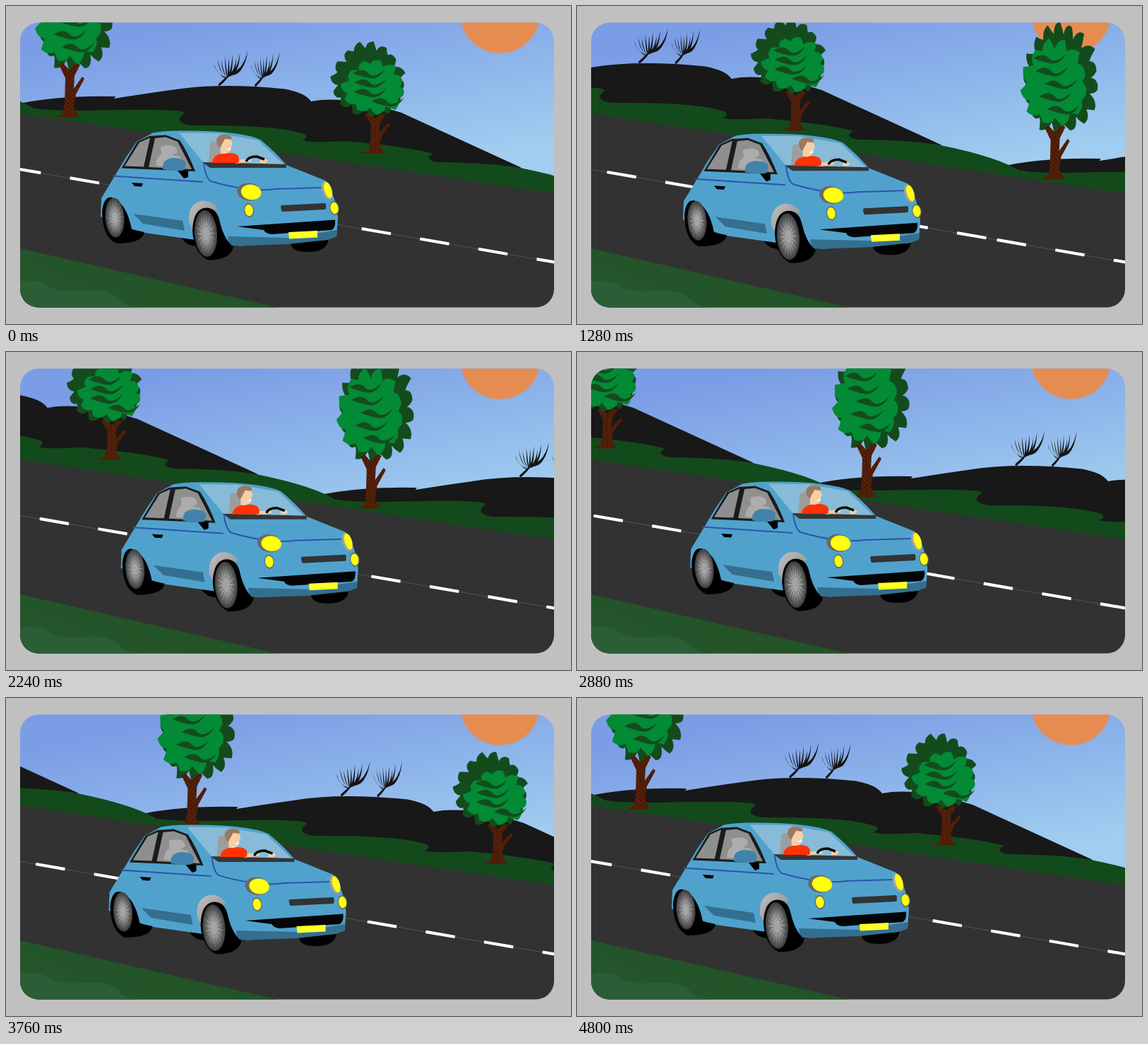
An HTML page for the animation above (4.88 s loop, 800 by 450 pixels).

```html
<!DOCTYPE html>
<html lang="en">
<head>
<meta charset="utf-8">
<title>Country drive</title>
<style>
  html, body { margin: 0; width: 100%; height: 100%; overflow: hidden; background: #c0c0c0; }
  svg { display: block; width: 800px; height: 450px; }
</style>
</head>
<body>
<svg viewBox="0 0 800 450">
  <defs>
    <clipPath id="window"><rect x="20" y="23.5" width="756" height="403" rx="26"/></clipPath>
    <linearGradient id="sky" gradientUnits="userSpaceOnUse" x1="380" y1="10" x2="425" y2="260">
      <stop offset="0" stop-color="#7b9de5"/><stop offset="1" stop-color="#a1cef0"/>
    </linearGradient>
    <radialGradient id="sun">
      <stop offset=".94" stop-color="#e68c51"/><stop offset="1" stop-color="#e68c51" stop-opacity="0"/>
    </radialGradient>
    <linearGradient id="verge" x1="0" y1="1" x2=".8" y2=".5">
      <stop offset="0" stop-color="#27562f"/><stop offset="1" stop-color="#215426"/>
    </linearGradient>
    <radialGradient id="hub">
      <stop offset="0" stop-color="#b4b4b4"/><stop offset=".4" stop-color="#858585"/><stop offset="1" stop-color="#3c3c3c"/>
    </radialGradient>
    <linearGradient id="arch" x2="1" y2="1">
      <stop offset="0" stop-color="#c2c2c2"/><stop offset="1" stop-color="#858585"/>
    </linearGradient>
    <pattern id="bark" width="7" height="6" patternUnits="userSpaceOnUse">
      <rect width="7" height="6" fill="#4c1c06"/>
      <path d="M1 1h.8M5 4h.8" stroke="#b0602c" stroke-width=".8"/>
    </pattern>
    <path id="trunk" d="M-16 0L-6 -5L-3 -20L-2 -55L-11 -74L-5 -76L4 -66L12 -76L19 -74L11 -58L10 -40L22 -57L25 -54L13 -32L10 -14L17 0L0 1Z" fill="url(#bark)"/>
    <g id="hills">
      <path d="M10 140Q70 126 155 128L153 131Q190 125 233 119Q300 108 395 117.5Q424 123 432 135Q480 126 560 151L728 228L800 290L10 170Z" fill="#181818"/>
    </g>
    <g id="grass">
      <path d="M10 138Q40 149 110 148Q260 144 252 152Q236 165 262 169Q390 168 424 182Q428 187 419 190Q430 194 480 191Q570 199 605 209Q590 217 610 221Q690 222 728 229Q812 246 843 267V300L10 170Z" fill="#134a1b"/>
    </g>
    <g id="trees"></g>
  </defs>

  <g clip-path="url(#window)">
    <rect width="800" height="450" fill="url(#sky)"/>
    <circle cx="699.5" cy="10" r="58.5" fill="url(#sun)"/>
    <g id="land"></g>
    <path d="M0 149L800 268.6V450H0Z" fill="#323232"/>
    <path d="M20 231.3L777 362.8" stroke="#626262" stroke-width=".7"/>
    <g id="dashes" stroke="#fff" stroke-width="4.2"></g>
    <path d="M0 338.5L20 343L386 427V450H0Z" fill="url(#verge)"/>
    <path d="M20 390Q48 386 60 396T110 403T160 415T216 427H20Z" fill="#2b5d37"/>

    <g id="car">
      <!-- underside and body -->
      <path d="M403 335L457 328Q456 347 430 348T403 335ZM248 327L274 332L270 340Q254 339 248 327Z"/>
      <path d="M135 272L170 214L185 192L208 179.5Q226 176 250 176.5Q330 176 360 189Q381 206 397 225L452 247Q467 268 470 299L468 326L455 331L330 339.5L190 320L134 298Z" fill="#50a2cd"/>
      <path d="M314 326L400 328L469 317L468 326L455 331L400 337L330 339.5L316 337Z" fill="#346f8f"/>

      <!-- side windows -->
      <path d="M163.5 229.5L186 192L203 184L226 182.5L246 190Q257 206 268 234Z" fill="#1b1b1b"/>
      <path d="M168 226.5L189 193L204 186.5L195 227.5ZM202 228L211 187L226 185.5L243 192L263 231Z" fill="#8f8f8f"/>
      <path d="M219 199Q242 193 242 207L236 211L246 213L253 229L212 226Q213 213 220 210Z" fill="#acacac"/>

      <!-- windscreen and driver -->
      <path d="M245 179.5L300 180L357 190L396 227L280 222Z" fill="#88bbd7"/>
      <path d="M289 196Q290 189 303 193L304 222H287Z" fill="#9d9d9d"/>
      <path d="M278 221L397 224V229H289Z" fill="#353535"/>
      <path d="M327 218L346 216L348 220L326 223ZM360 218L366 215L371 219L367 222H360Z" fill="#f5cfa7"/>
      <path d="M292 222Q292 209 313 208T329 222Z" fill="#ff3206"/>
      <path d="M303 189Q308 183 318 188L321 195L319 198Q320 207 311 209L304 209Z" fill="#f5cfa7"/>
      <path d="M298 190Q300 179 315 183Q320 182 319 189L310 188L303 201Q298 196 298 190Z" fill="#9b7860"/>
      <path d="M312 202Q316 203 318 200V203Q315 205 312 202Z" fill="#fff"/>
      <path d="M340 220Q343 213 355 213L366 217" fill="none" stroke="#080808" stroke-width="3.5"/>

      <!-- trim -->
      <path d="M151 240.5L279 249M280 222Q282 242 290 248Q345 264 381 259L447 257" fill="none" stroke="#2b55a9" stroke-width="2"/>
      <path d="M222 226Q223 217 235 215Q262 215 252 232Q240 235 222 231Z" fill="#4183ac"/>
      <path d="M243 233H258V242L252 244ZM178 250L194 251L192 255.5L182 255Z"/>
      <path d="M180 294L250 304L253 318L194 308Z" fill="#346f8f"/>
      <path d="M391 284L451 281V286L392 289Z" fill="#333" stroke="#333" stroke-width="4" stroke-linejoin="round"/>
      <path d="M327 312L466 302.5Q467 314 461 317L376 323Q367 322 365 317Z" fill="#050505"/>
      <path d="M400 320L441 318V327.5L401 329.5Z" fill="#ffff2a"/>
      <g id="lamps"></g>

      <!-- tyres -->
      <path d="M136 292Q138 269 150 271Q171 279 178 316L196 320Q193 336 157 336Q137 328 136 292Z"/>
      <path d="M259 306Q257 282 275 276Q289 273 300 286L266 320Z" fill="url(#arch)"/>
      <path d="M264 318Q265 286 284 285.5Q299 286 303 306Q309 331 322 341Q317 360 286 359.5Q266 350 264 318Z"/>
      <g id="wheels"></g>
    </g>
  </g>
</svg>

<script>
const STEP = 80, STEPS = 60, LOOP = 4880;
const SPAN = 800, LAND_SLOPE = 0.15, ROAD_SLOPE = 0.1737;
const DARK = '#144b1d', LIGHT = '#028a35';
const NS = 'http://www.w3.org/2000/svg', TAU = 2 * Math.PI;
const $ = id => document.getElementById(id);

function add(parent, tag, attrs) {
  const el = document.createElementNS(NS, tag);
  for (const k in attrs) el.setAttribute(k, attrs[k]);
  return parent.appendChild(el);
}
const group = (parent, transform) => add(parent, 'g', { transform });
const random = seed => () => (seed = seed * 16807 % 2147483647) / 2147483647;

// Ragged crown: a ring of curved leaf tips, wider towards the bottom
function crown(fill, cx, cy, rx, ry, leaves, seed) {
  const rnd = random(seed), step = TAU / leaves;
  const at = (a, r) => [cx + rx * r * (1 + .12 * Math.sin(a)) * Math.cos(a), cy + ry * r * Math.sin(a)];
  let d = 'M' + at(0, .82);
  for (let i = 0; i < leaves; i++) {
    const a = i * step;
    d += `Q${at(a + step * .15, 1)} ${at(a + step * .65, .94 + .14 * rnd())}Q${at(a + step * .85, .88)} ${at(a + step, .76 + .12 * rnd())}`;
  }
  add($('trees'), 'path', { d: d + 'Z', fill });
}

// Dark wavy gaps between the light leaves
function gaps(cx, cy, w, h, count, seed) {
  const rnd = random(seed);
  for (let i = 0; i < count; i++) {
    const x = cx + (rnd() - .75) * w, y = cy + (i / (count - 1) - .5) * h;
    add($('trees'), 'path', { d: `M${x} ${y}q14 -9 22 0t24 -6q-9 16 -23 13t-23 -7Z`, fill: DARK });
  }
}
const trunk = (x, y, k) => add($('trees'), 'use', { href: '#trunk', transform: `translate(${x} ${y}) scale(1 ${k})` });

// Bare bush: tapering twigs that bend outwards, then up
function bush(x, y, width) {
  const g = group($('trees'), `translate(${x} ${y}) scale(${width} 1)`);
  const twig = (x0, y0, cx, cy, x1, y1) => add(g, 'path', {
    d: `M${x0 - 1} ${y0 - 1}Q${cx - 1.3} ${cy - 1.3} ${x1} ${y1}Q${cx + 1.3} ${cy + 1.6} ${x0 + 1} ${y0 + 1.5}Z`,
    fill: '#141414'
  });
  twig(-17, 15, -6, 6, 1, -4);
  for (let i = 0; i < 10; i++) {
    const u = i / 4.5 - 1, top = i % 2 ? -28 - 6 * u : -16 - 8 * (1 - u * u);
    twig(-3 + 4 * u, 2 - 3 * u, 20 * u, 3 + top * .25, 24 * u, top);
  }
}

bush(318, 97, 1);
bush(367, 98, .85);
trunk(519, 208, .74);
crown(DARK, 513, 103, 53, 53, 15, 11);
crown(LIGHT, 521, 114, 45, 39, 11, 5);
gaps(521, 115, 40, 40, 4, 8);
crown(DARK, 99, 14, 54, 80, 17, 23);
crown(LIGHT, 90, 20, 47, 61, 12, 7);
gaps(88, 22, 38, 72, 5, 31);
trunk(86, 157, 1);

for (const id of ['hills', 'grass', 'trees'])
  for (const i of [-1, 0, 1])
    add($('land'), 'use', { href: '#' + id, x: i * SPAN, y: i * SPAN * LAND_SLOPE });

// Centre line: ten dashes per span, the last gap is shorter
const roadY = x => 231.1 + (x - 20) * ROAD_SLOPE;
for (let i = 0; i < 20; i++) {
  const x = 8 + Math.floor(i / 10) * SPAN + i % 10 * 82.6;
  add($('dashes'), 'line', { x1: x, y1: roadY(x), x2: x + 41.3, y2: roadY(x + 41.3) });
}

function lamp(x, y, rx, ry, tilt, rim, shift) {
  const g = group($('lamps'), `translate(${x} ${y}) rotate(${tilt})`);
  add(g, 'ellipse', { rx, ry, fill: rim });
  add(g, 'ellipse', { cx: shift, rx: rx - 1.2 - shift / 2, ry: ry - 1.7, fill: '#ffff08' });
}
lamp(344, 263, 17, 12.5, 8, '#696969', 3);
lamp(454.5, 261, 7, 13.5, -17, '#a0a0a0', 1.5);
lamp(344, 289, 7, 10, -8, '#666', 0);
lamp(465, 286, 6.7, 10, -8, '#666', 0);

function wheel(x, y, rx, ry) {
  const g = group($('wheels'), `translate(${x} ${y}) rotate(-4) scale(${rx} ${ry})`);
  add(g, 'circle', { r: 1, fill: 'url(#hub)' });
  const spokes = group(g, '');
  for (let a = 0; a < 360; a += 20)
    add(spokes, 'path', { d: 'M.36 -.015L.92 0L.36 .015Z', fill: '#ccc', transform: `rotate(${a})` });
  add(g, 'circle', { r: .3, fill: '#a4a4a4' });
  return spokes;
}
const rims = [wheel(154, 299.5, 13.5, 28), wheel(283, 322, 16, 33)];

const move = (el, x, y) => el.setAttribute('transform', `translate(${x} ${y})`);

function draw(now) {
  const p = Math.floor(now % LOOP / STEP) / STEPS;
  const x = -SPAN * p, sway = (1 - Math.cos(TAU * p)) / 2;
  move($('land'), x, x * LAND_SLOPE);
  move($('dashes'), x, x * ROAD_SLOPE);
  move($('car'), 29 * sway, 7.8 * sway);
  rims.forEach(r => r.setAttribute('transform', `rotate(${p * 1800})`));
}

const start = performance.now();
function tick() {
  draw(performance.now() - start);
  requestAnimationFrame(tick);
}
tick();
</script>
</body>
</html>
```
